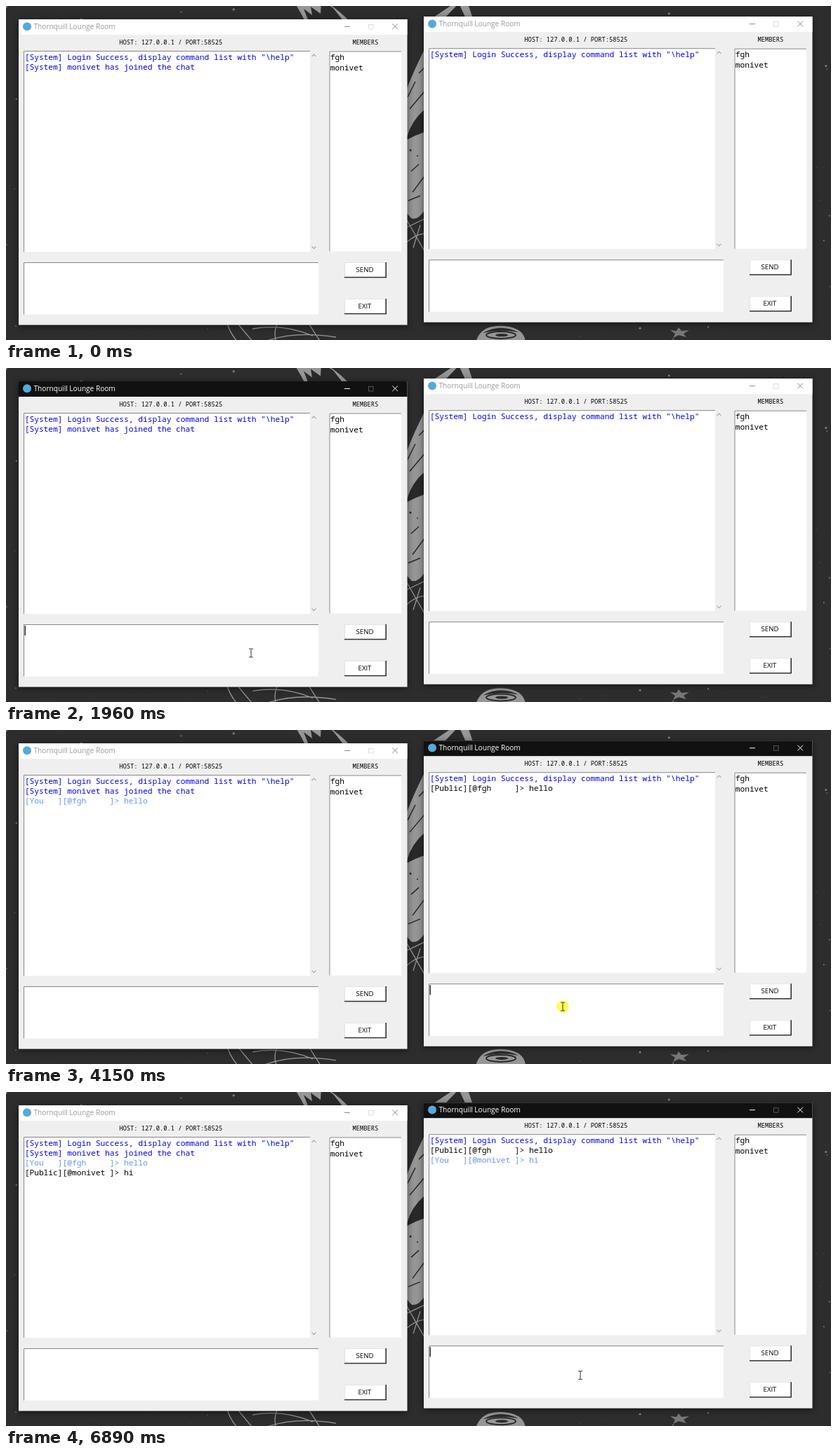
Recreate the animation shown at these times as an HTML page. Size 1175 by 477 pixels, loop 6960 ms.

```html
<!DOCTYPE html>
<html lang="en">
<head>
<meta charset="utf-8">
<title>Two chat windows</title>
<style>
html, body { margin: 0; width: 1175px; height: 477px; overflow: hidden; background: #2d2d2d; }
svg { display: block; }
text { white-space: pre; }
.ui { font-family: "Open Sans", "Noto Sans", sans-serif; }
.mono { font-family: "Noto Sans Mono", "DejaVu Sans Mono", monospace; font-size: 11.22px; }
.small { font-size: 8.75px; }
.window { filter: drop-shadow(0 2px 5px rgba(0, 0, 0, .55)); }
.bar { fill: #fff; }
.name { fill: #999; font-size: 10.1px; }
.ctl { stroke: #888; fill: none; }
.max { stroke: #ddd; fill: none; }
.active .bar { fill: #111; }
.active .name { fill: #fff; }
.active .ctl { stroke: #fff; }
.active .max { stroke: #555; }
</style>
</head>
<body>
<svg id="stage" width="1175" height="477" viewBox="0 0 1175 477"></svg>
<script>
const LOOP = 6960, LINE = 14.2, CHAR = 6.735;
const TITLE = 'Thornquill Lounge Room';
const A = 'fgh', B = 'monivet';
const BLUE = '#0000f5', SKY = '#6495ed', BLACK = '#000';
const CLICK_A = 850, CLICK_B = 4050, SENT_A = 2910, SENT_B = 5220;

const esc = s => s.replace(/&/g, '&amp;').replace(/</g, '&lt;').replace(/>/g, '&gt;');
const rect = (x, y, w, h, fill) => `<rect x="${x}" y="${y}" width="${w}" height="${h}" fill="${fill}"/>`;
const path = (d, attrs) => `<path d="${d}" ${attrs}/>`;
const text = (x, y, s, cls, attrs = '') => `<text x="${x}" y="${y}" class="${cls}" ${attrs}>${esc(s)}</text>`;

// Wallpaper
function rng(seed) {
  return () => (seed = (seed * 16807) % 2147483647) / 2147483647;
}

function specks() {
  const rand = rng(4217);
  let out = '';
  for (let i = 0; i < 620; i++) {
    const x = rand() * 1175, y = rand() * 477, r = .3 + rand() ** 5 * 1.5, o = .25 + rand() * .5;
    if (x > 400 && x < 740) continue;
    out += `<circle cx="${x.toFixed(1)}" cy="${y.toFixed(1)}" r="${r.toFixed(2)}" fill="#bbb" opacity="${o.toFixed(2)}"/>`;
  }
  return out;
}

function art() {
  const grey = 'fill="#969696"', dark = 'fill="#292929"';
  const thin = 'fill="none" stroke="#969696" stroke-width="1.3"';
  const ink = 'fill="none" stroke="#292929" stroke-width="1.5"';
  return path('M410-6L452-6Q472 3 489 22L426 22Q420 9 410-6Z', grey)
    + path('M431 22L424 4L436 13L434 1L448 11L449-6L459-6L481 22Z', dark)
    + path('M452-6L466 2L487 21', thin)
    + path('M606 18L642-6L657-6L665 18Z', grey)
    + path('M624 18L645-4L655 18Z', dark)
    + path('M596 62L596 292Q586 307 577 303L571 296L571 118Q580 94 596 62Z', grey)
    + path('M571 187Q578 163 596 148L596 180Q584 184 571 191Z', dark)
    + path('M572 130L583 108M575 147L596 122M588 96L596 88M577 236L588 226M579 266L596 243M573 278L590 271', ink)
    + `<circle cx="576" cy="206" r="1.5" ${dark}/><circle cx="586" cy="214" r="1" ${dark}/>`
    + path('M571 316L596 304M571 337Q584 326 596 325M580 345L590 313M571 306L596 350', thin)
    + path('M314 450Q318 466 330 480M327 450L352 480M388 450Q380 465 385 480M351 461Q395 453 437 471M366 480Q410 463 470 473M429 450L448 480', thin)
    + path('M669 480Q674 462 692 458Q714 454 730 463Q739 469 740 480Z', grey)
    + path('M679 467Q704 453 730 466Q706 461 679 467Z', dark)
    + `<ellipse cx="705" cy="470" rx="21" ry="5" fill="none" stroke="#292929" stroke-width="2"/>`
    + `<ellipse cx="706" cy="470" rx="9" ry="2" ${dark}/>`;
}

const splat = path('M946 463L955 464L958 459L962 464L973 463L965 468L969 473L958 470L950 474L953 468Z', 'fill="#777"');

// Chat window, laid out at the position of the left one
const sunken = (x, y, w, h) => rect(x, y, w, h, '#fff')
  + path(`M${x + .5} ${y + h}V${y + .5}H${x + w}`, 'fill="none" stroke="#858585"');

const button = (y, label) => rect(482, y, 60, 22, '#fff')
  + path(`M482.5 ${y + 22}V${y + .5}H541`, 'fill="none" stroke="#e3e3e3"')
  + path(`M482 ${y + 21.5}H541.2V${y}`, 'fill="none" stroke="#333" stroke-width="1.6"')
  + text(511, y + 14, label, 'ui', 'text-anchor="middle" font-size="9.6"');

const chevron = (y, dir) =>
  path(`M435.5 ${y + dir * 1.5}L438.5 ${y - dir * 1.5}L441.5 ${y + dir * 1.5}`, 'fill="none" stroke="#aaa" stroke-width="1.2"');

const chatWindow = (id, dx, dy) => `
<g id="${id}" transform="translate(${dx} ${dy})">
  <g class="window">${rect(18, 19, 553.5, 436.5, '#efefef')}</g>
  <rect class="bar" x="18" y="19" width="553.5" height="22"/>
  <circle cx="30" cy="29.3" r="6" fill="#56a9dc"/>
  ${text(39.5, 33, TITLE, 'ui name')}
  <path class="ctl" d="M482 29.5H490M550.3 25.5L558 33.2M558 25.5L550.3 33.2"/>
  <rect class="max" x="516.5" y="26.5" width="6.5" height="6.5"/>
  ${text(161.3, 55.3, 'HOST: 127.0.0.1 / PORT:58525', 'mono small')}
  ${text(493.5, 55.3, 'MEMBERS', 'mono small')}
  ${sunken(25, 64, 408, 287)}
  ${chevron(70.5, 1)}${chevron(345, -1)}
  ${sunken(460.5, 64.5, 102.5, 286)}
  ${text(461.7, 76.5, A, 'mono')}${text(461.7, 91.5, B, 'mono')}
  ${sunken(25, 366, 420, 74.5)}
  ${button(366, 'SEND')}${button(418, 'EXIT')}
  <g class="log"></g>
  <text class="mono draft" x="26.7" y="379.3"></text>
  <rect class="caret" width="1.2" height="14" fill="#000"/>
</g>`;

document.getElementById('stage').innerHTML = `
${rect(0, 0, 1175, 477, '#2d2d2d')}${specks()}${splat}
<g id="art">${art()}</g>
${chatWindow('left', 0, 0)}${chatWindow('right', 577, -3.8)}
<g id="pointer">
  <circle id="glow" r="8.7" fill="#ffff57" style="mix-blend-mode:multiply"/>
  <path id="beam" d="M-3-6H-1L0-5L1-6H3M0-5V5M-3 6H-1L0 5L1 6H3" fill="none" stroke="#444" stroke-width="1.1"/>
  <path id="arrow" d="M0 0V13L3 10.2L5 15L7 14.2L5 9.6H9.2Z" fill="#fff" stroke="#000" stroke-width=".8"/>
</g>`;

const $ = id => document.getElementById(id);
const pad = s => s.padEnd(8);
const login = { at: 0, color: BLUE, s: '[System] Login Success, display command list with "\\help"' };
const said = (at, tag, who, s) => ({ at, color: tag === 'You' ? SKY : BLACK, s: `[${tag.padEnd(6)}][@${pad(who)}]> ${s}` });

const users = [
  {
    el: $('left'), focus: [CLICK_A, CLICK_B],
    log: [login, { at: 0, color: BLUE, s: `[System] ${B} has joined the chat` },
      said(SENT_A, 'You', A, 'hello'), said(SENT_B, 'Public', B, 'hi')],
    keys: [[2040, 'h'], [2190, 'e'], [2340, 'l'], [2480, 'l'], [2620, 'o'], [2780, '\n']], sent: SENT_A
  },
  {
    el: $('right'), focus: [CLICK_B, LOOP],
    log: [login, said(SENT_A, 'Public', A, 'hello'), said(SENT_B, 'You', B, 'hi')],
    keys: [[4760, 'h'], [4920, 'i'], [5140, '\n']], sent: SENT_B
  }
];

for (const u of users) {
  const log = u.el.querySelector('.log');
  log.innerHTML = u.log.map((m, i) => text(26.7, 76.6 + i * LINE, m.s, 'mono', `fill="${m.color}"`)).join('');
  u.rows = [...log.children];
  u.draft = u.el.querySelector('.draft');
  u.caret = u.el.querySelector('.caret');
}

const show = (el, on) => el.setAttribute('visibility', on ? 'visible' : 'hidden');

function drawUser(u, t) {
  const [from, to] = u.focus, active = t >= from && t < to;
  u.el.classList.toggle('active', active);
  u.rows.forEach((row, i) => show(row, t >= u.log[i].at));
  const typed = t < u.sent ? u.keys.filter(k => k[0] <= t).map(k => k[1]).join('') : '';
  const lines = typed.split('\n');
  u.draft.textContent = lines[0];
  u.caret.setAttribute('x', 26.6 + lines[lines.length - 1].length * CHAR);
  u.caret.setAttribute('y', 368 + (lines.length - 1) * LINE);
  show(u.caret, active && (t - from) % 900 < 600);
}

// Pointer stops: time, x, y
const stops = [[380, 398, 492], [800, 349, 407], [3600, 349, 407], [3980, 793, 395], [5900, 793, 395], [6400, 818, 404.5]];
const ease = p => p * p * (3 - 2 * p);

function pointerAt(t) {
  if (t <= stops[0][0]) return stops[0].slice(1);
  for (let i = 1; i < stops.length; i++) {
    const [t0, x0, y0] = stops[i - 1], [t1, x1, y1] = stops[i];
    if (t < t1) {
      const p = ease((t - t0) / (t1 - t0));
      return [x0 + (x1 - x0) * p, y0 + (y1 - y0) * p];
    }
  }
  return stops[stops.length - 1].slice(1);
}

const inEntry = (x, y) => (x > 25 && x < 445 && y > 366 && y < 440) || (x > 602 && x < 1022 && y > 362 && y < 437);

function drawPointer(t) {
  const [x, y] = pointerAt(t), beam = inEntry(x, y);
  $('pointer').setAttribute('transform', `translate(${x.toFixed(2)} ${y.toFixed(2)})`);
  show($('beam'), beam);
  show($('arrow'), !beam);
  show($('glow'), [CLICK_A, CLICK_B].some(c => t >= c - 20 && t < c + 200));
}

function render(t) {
  $('art').setAttribute('transform', `translate(0 ${(-1.2 * Math.sin(t / LOOP * 4 * Math.PI)).toFixed(2)})`);
  users.forEach(u => drawUser(u, t));
  drawPointer(t);
}

const start = performance.now();
function tick() {
  render((performance.now() - start) % LOOP);
  requestAnimationFrame(tick);
}
tick();
</script>
</body>
</html>
```
